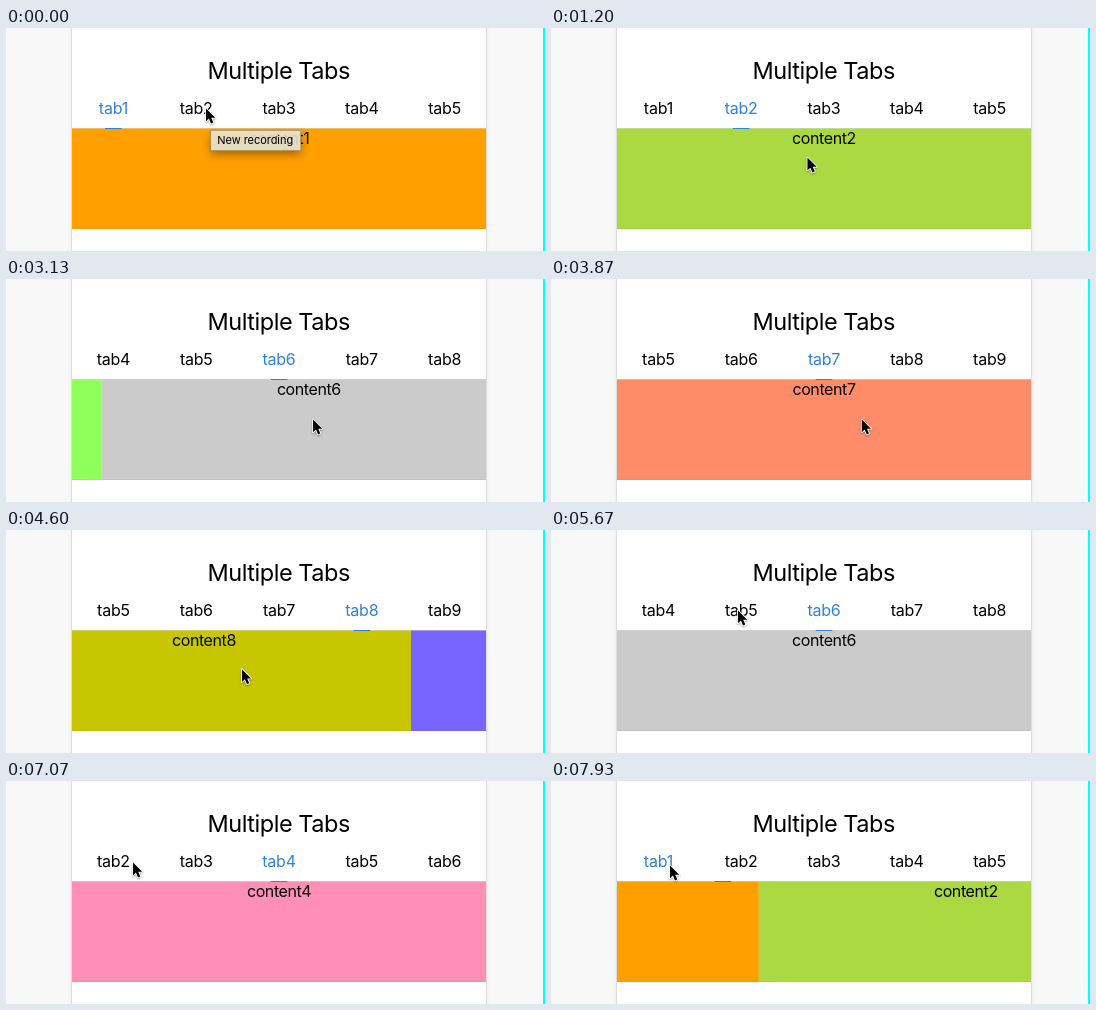
Animation, 539 px wide and 223 px high, one loop 8 s. Source, as an HTML page with a canvas:

```html
<!DOCTYPE html>
<html lang="en">
<head>
<meta charset="utf-8">
<title>Multiple Tabs</title>
<style>
html, body { margin: 0; width: 100%; height: 100%; overflow: hidden; background: #f8f8f8; }
canvas { display: block; }
</style>
</head>
<body>
<canvas id="stage" width="539" height="223"></canvas>
<script>
const ctx = document.getElementById('stage').getContext('2d');
const LOOP = 8000, LEFT = 66, WIDTH = 414, TAB = WIDTH / 5, COUNT = 9;
const DRAG_MS = 170, DRAG_PX = 110, SLIDE_MS = 300, STRIP_MS = 180, CLICK_LAG = 55;
const GRAB_X = 311, GRAB_Y = 139;
const FONT = 'Inter, Roboto, sans-serif';
const BLUE = '#2e82d8';
const COLORS = ['#ff9f00', '#aad942', '#5cc8f5', '#ff8fb6', '#8fff5c',
                '#cbcbcb', '#ff8c69', '#c8c600', '#7864ff'];

// Swipes walk from page 2 to the last page, slowing down a little each time
const swipeStart = k => 1317 + 438 * k + 15 * k * k;
const swipes = Array.from({ length: COUNT - 2 }, (_, k) => ({ at: swipeStart(k), to: k + 3, drag: true }));
const clicks = [[730, 2], [5270, 6], [5720, 5], [6220, 4], [7200, 2], [7846, 1]]
  .map(([at, to]) => ({ at, to, drag: false }));
const moves = [...swipes, ...clicks].sort((a, b) => a.at - b.at);

// Pointer rests between clicks; each swipe adds a grab, a release and a way back
const path = [[0, 200, 79], [760, 200, 79], [1000, 207, 88], [1200, 256, 128],
              [5000, 195, 88], [5130, 187, 79], [6500, 187, 79], [7070, 127, 80],
              [7300, 127, 80], [7700, 119, 83], [LOOP, 119, 83]];
swipes.forEach(({ at }, k) => {
  if (k) path.push([at - 180, GRAB_X - 4, GRAB_Y]);
  path.push([at, GRAB_X, GRAB_Y], [at + DRAG_MS, GRAB_X - DRAG_PX, GRAB_Y - 2]);
});
path.sort((a, b) => a[0] - b[0]);

const clamp = v => Math.min(1, Math.max(0, v));
const mix = (a, b, k) => a + (b - a) * k;

function bezier(x1, y1, x2, y2) {
  const curve = (a, b, s) => 3 * a * s * (1 - s) ** 2 + 3 * b * s * s * (1 - s) + s ** 3;
  return v => {
    const x = clamp(v);
    if (x === 0 || x === 1) return x;
    let lo = 0, hi = 1;
    for (let i = 0; i < 24; i++) {
      const mid = (lo + hi) / 2;
      if (curve(x1, x2, mid) < x) lo = mid; else hi = mid;
    }
    return curve(y1, y2, lo);
  };
}
const slideEase = bezier(.35, 0, .25, 1);
const stripEase = bezier(.25, .1, .25, 1);

const scrollFor = page => Math.min(COUNT - 5, Math.max(0, page - 3));

function stateAt(t) {
  const i = moves.filter(m => m.at <= t).length - 1;
  if (i < 0) return { page: 1, active: 1, line: 1, scroll: 0 };
  const { at, to, drag } = moves[i];
  const from = i ? moves[i - 1].to : 1;
  const pull = drag ? DRAG_PX / WIDTH * clamp((t - at) / DRAG_MS) : 0;
  const age = t - at - (drag ? DRAG_MS : 0);
  const k = stripEase((age - (drag ? 0 : CLICK_LAG)) / STRIP_MS);
  return {
    page: mix(from + pull, to, slideEase(age / SLIDE_MS)),
    active: age < 0 ? from : to,
    line: mix(from, to, k),
    scroll: mix(scrollFor(from), scrollFor(to), k)
  };
}

function pointerAt(t) {
  const i = path.findIndex(p => p[0] > t);
  const a = path[i - 1], b = path[i];
  const k = (t - a[0]) / (b[0] - a[0]);
  return [mix(a[1], b[1], k), mix(a[2], b[2], k)];
}

function rect(x, y, w, h, color) {
  ctx.fillStyle = color;
  ctx.fillRect(x, y, w, h);
}

function text(str, x, y, size, spacing, color = '#000') {
  ctx.font = `${size}px ${FONT}`;
  ctx.letterSpacing = spacing + 'px';
  ctx.textAlign = 'center';
  ctx.fillStyle = color;
  ctx.fillText(str, x, y);
}

function drawFrame() {
  rect(0, 0, 539, 223, '#f8f8f8');
  ctx.save();
  ctx.shadowColor = 'rgba(0,0,0,.1)';
  ctx.shadowBlur = 4;
  rect(LEFT, -10, WIDTH, 243, '#fff');
  ctx.restore();
  rect(LEFT - 1, 0, 1, 223, '#dedede');
  rect(LEFT + WIDTH, 0, 1, 223, '#dedede');
  rect(537, 0, 2, 223, '#00ffff');
  text('Multiple Tabs', 272.7, 51, 23.5, -.45);
}

function drawTabs(s) {
  ctx.save();
  ctx.beginPath();
  ctx.rect(LEFT, 0, WIDTH, 223);
  ctx.clip();
  rect(LEFT, 100, WIDTH, 1, '#dcdcdc');
  for (let n = 1; n <= COUNT; n++) {
    if (Math.abs(n - s.page) < 1) {
      const x = LEFT + (n - s.page) * WIDTH;
      rect(x, 100.5, WIDTH, 100.5, COLORS[n - 1]);
      text('content' + n, x + WIDTH / 2, 116, 16, -.4);
    }
    const tabX = LEFT + (n - .5 - s.scroll) * TAB;
    text('tab' + n, tabX, 86, 16, -.25, n === s.active ? BLUE : '#000');
  }
  rect(LEFT, 200, WIDTH, 1, 'rgba(120,120,120,.1)');
  rect(LEFT + (s.line - .5 - s.scroll) * TAB - 8.3, 100, 16.6, 1, BLUE);
  ctx.restore();
}

function drawTooltip(t) {
  const alpha = 1 - clamp((t - 65) / 200);
  if (alpha <= 0) return;
  ctx.save();
  ctx.globalAlpha = alpha;
  ctx.save();
  ctx.shadowColor = 'rgba(0,0,0,.4)';
  ctx.shadowBlur = 8;
  ctx.shadowOffsetY = 4;
  rect(205, 102.5, 90, 20, 'rgba(238,234,215,.88)');
  ctx.restore();
  ctx.strokeStyle = 'rgba(150,140,110,.6)';
  ctx.lineWidth = 1;
  ctx.strokeRect(204.5, 102.5, 90, 20);
  text('New recording', 249.2, 116, 11, -.05);
  ctx.restore();
}

function drawPointer([x, y]) {
  const shape = [[0, 0], [0, 14.5], [3.3, 11.5], [5.7, 17], [8.3, 15.9], [5.9, 10.5], [10.5, 10.5]];
  ctx.save();
  ctx.translate(x, y + 1.5);
  ctx.scale(.88, .88);
  ctx.beginPath();
  shape.forEach(p => ctx.lineTo(...p));
  ctx.closePath();
  ctx.lineJoin = 'round';
  ctx.lineWidth = 2;
  ctx.strokeStyle = '#fff';
  ctx.shadowColor = 'rgba(0,0,0,.35)';
  ctx.shadowBlur = 2;
  ctx.shadowOffsetY = 1;
  ctx.stroke();
  ctx.shadowColor = 'transparent';
  ctx.fillStyle = '#000';
  ctx.fill();
  ctx.restore();
}

function render() {
  const t = performance.now() % LOOP;
  drawFrame();
  drawTabs(stateAt(t));
  drawTooltip(t);
  drawPointer(pointerAt(t));
  requestAnimationFrame(render);
}
render();
</script>
</body>
</html>
```
